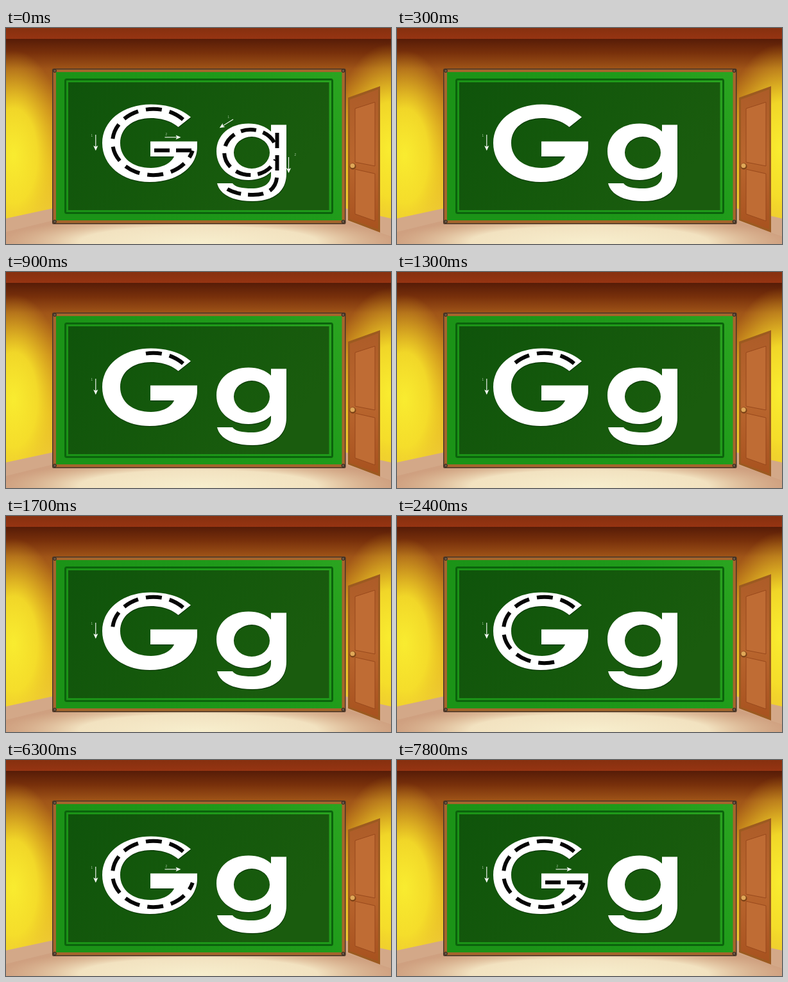
Recreate the animation shown at these times as an HTML page. Size 600 by 338 pixels, loop 8000 ms.

```html
<!DOCTYPE html>
<html lang="en">
<head>
<meta charset="utf-8">
<title>Letter tracing</title>
<style>
  html, body { margin: 0; width: 100%; height: 100%; overflow: hidden; background: #8a3f08; }
  svg { display: block; width: 100vw; height: 100vh; }
  .trace { fill: none; stroke: #050505; stroke-width: 6; }
  #lower .trace { stroke-dasharray: 24 11; }
  .arrow { fill: none; stroke: #fff; stroke-width: 1.1; }
  .head { fill: #fff; }
  text { font: 4.5px "Liberation Sans", Arial, sans-serif; fill: #b5d0b0; }
</style>
</head>
<body>
<svg viewBox="0 0 600 338" preserveAspectRatio="none">
  <defs>
    <linearGradient id="ceiling" x2="0" y2="1">
      <stop stop-color="#86300f"/><stop offset="1" stop-color="#963412"/>
    </linearGradient>
    <linearGradient id="wall" gradientUnits="userSpaceOnUse" x1="0" y1="16" x2="0" y2="300">
      <stop stop-color="#551b07"/><stop offset=".08" stop-color="#78300b"/>
      <stop offset=".17" stop-color="#a05518"/><stop offset=".4" stop-color="#c4801a"/>
      <stop offset=".72" stop-color="#e6b824"/><stop offset="1" stop-color="#f0cf3c"/>
    </linearGradient>
    <radialGradient id="glow">
      <stop stop-color="#f9ec30"/><stop offset=".45" stop-color="#f6e02a" stop-opacity=".9"/>
      <stop offset="1" stop-color="#e8b820" stop-opacity="0"/>
    </radialGradient>
    <radialGradient id="light">
      <stop stop-color="#f7eecd"/><stop offset=".6" stop-color="#f2e2c0"/>
      <stop offset="1" stop-color="#e0bf98" stop-opacity="0"/>
    </radialGradient>
    <linearGradient id="door" x2="0" y2="1">
      <stop stop-color="#ad5c28"/><stop offset=".5" stop-color="#b9662e"/><stop offset="1" stop-color="#a8521f"/>
    </linearGradient>
    <linearGradient id="rim" y2="-.3">
      <stop stop-color="#1b9317"/><stop offset=".6" stop-color="#1f9b1a"/><stop offset="1" stop-color="#2ea722"/>
    </linearGradient>
    <linearGradient id="slate" y2=".4">
      <stop stop-color="#0f540b"/><stop offset=".6" stop-color="#15590c"/><stop offset="1" stop-color="#1a5c0e"/>
    </linearGradient>
    <path id="bigG" d="M288 139.500C273 126 250 119.500 226 119.500C181 119.500 150 146 150 180C150 215 181 241 224 241C268 241 298 217 298 186V177.500H225V201H262C257 212 243 219 226 219C197 219 178 203 178 180C178 157 197 141 226 141C243 141 258 146 268.500 155Z"/>
    <path id="smallG" fill-rule="evenodd" d="M413 151.500H437V228C437 256 417 271 384 271C354 271 333 261 329 243H353C357 249 368 251 383 251C402 251 413 243 413 230V225C405 233 392 238 378 238C349 238 328 219 328 193C328 167 349 149.500 378 149.500C392 149.500 405 154 413 162ZM355 195A28 25 0 0 0 411 195A28 25 0 0 0 355 195Z"/>
    <g id="arrow"><path class="arrow" d="M0 0H20"/><path class="head" d="M17 -3.600L25 0L17 3.600L19 0Z"/></g>
    <circle id="screw" r="2.400" fill="#6b5a48" stroke="#2c2018"/>
  </defs>

  <!-- room -->
  <rect width="600" height="338" fill="url(#wall)"/>
  <ellipse cx="12" cy="200" rx="82" ry="165" fill="url(#glow)"/>
  <ellipse cx="598" cy="190" rx="90" ry="165" fill="url(#glow)"/>
  <rect width="600" height="17" fill="url(#ceiling)"/>
  <path d="M0 298L74 282H528L600 298V338H0Z" fill="#d3a888"/>
  <path d="M0 319L74 301H528L600 326V338H0Z" fill="#cfa080"/>
  <ellipse cx="300" cy="335" rx="310" ry="42" fill="url(#light)"/>

  <!-- door -->
  <path d="M533 109L583 91V320L533 301Z" fill="#9c5a20"/>
  <path d="M536 112L580 96V315L536 299Z" fill="url(#door)"/>
  <g fill="#bf6c34" stroke="#98491c">
    <path d="M544 126L575 116V216L544 210Z"/>
    <path d="M544 221L575 228V302L544 291Z"/>
  </g>
  <circle cx="540.500" cy="216.500" r="5" fill="#7d4317"/>
  <circle cx="540" cy="215.500" r="3.600" fill="#e0a858"/>

  <!-- board -->
  <rect x="72" y="63.500" width="457.500" height="243.500" rx="2" fill="#46362a"/>
  <rect x="73.500" y="65" width="454.500" height="240.500" fill="#a4652c"/>
  <rect x="78" y="69" width="445.500" height="232" fill="url(#rim)"/>
  <rect x="92.500" y="80.500" width="416" height="209" rx="2" fill="none" stroke="#0b630c" stroke-width="3"/>
  <rect x="97" y="85" width="406.500" height="200" fill="url(#slate)"/>
  <use href="#screw" x="76" y="67"/><use href="#screw" x="525.500" y="67"/>
  <use href="#screw" x="76" y="303"/><use href="#screw" x="525.500" y="303"/>

  <!-- letters -->
  <g fill="#0a3806" transform="translate(.4 1.300)"><use href="#bigG"/><use href="#smallG"/></g>
  <g fill="#fff"><use href="#bigG"/><use href="#smallG"/></g>
  <path id="ring" class="trace" pathLength="309.500" d="M276 143.200A63.500 51.700 0 1 0 290.800 192"/>
  <path id="bar" class="trace" d="M231 191.500H290"/>

  <!-- direction hints -->
  <use href="#arrow" transform="translate(139.800 167) rotate(90)"/>
  <text x="132.500" y="170">1</text>
  <g id="hint">
    <use href="#arrow" transform="translate(247.500 171)"/>
    <text x="248.500" y="168">2</text>
  </g>
  <g id="lower">
    <path class="trace" d="M418 179A41 35.500 0 1 0 420 206"/>
    <path class="trace" d="M422.500 164V228C422.500 252 408 261 385 261C368 261 355 258 345 252"/>
    <use href="#arrow" transform="translate(354 143) rotate(148)"/>
    <text x="345.500" y="141">1</text>
    <use href="#arrow" transform="translate(440.500 202) rotate(90)"/>
    <text x="449.500" y="200">2</text>
  </g>
</svg>
<script>
  const LOOP = 8000, STEP = 300;
  const INTRO_END = 100, RING_RESET = 3200, HINT_START = 6300, BAR_RESET = 7200;
  const [ring, bar, hint, lower] = ["ring", "bar", "hint", "lower"].map(id => document.getElementById(id));

  // Number of dashes drawn when one is added every STEP from a start time.
  const dashCount = (t, start, max) =>
    Math.min(max, Math.max(0, Math.floor((t - start) / STEP) + 1));

  function showDashes(path, count, on, off) {
    path.style.strokeDasharray = `${on} ${off} `.repeat(count) + "0 999";
  }

  function show(el, visible) {
    el.style.visibility = visible ? "visible" : "hidden";
  }

  function draw(t) {
    const intro = t < INTRO_END;
    const ringStart = t < RING_RESET ? 600 : 3600;
    const barStart = t < BAR_RESET ? 6600 : 7500;
    showDashes(ring, intro ? 9 : dashCount(t, ringStart, 9), 24.9, 12.3);
    showDashes(bar, intro ? 2 : dashCount(t, barStart, 2), 24, 10);
    show(hint, intro || t >= HINT_START);
    show(lower, intro);
  }

  const start = performance.now();
  function tick() {
    draw((performance.now() - start) % LOOP);
    requestAnimationFrame(tick);
  }
  tick();
</script>
</body>
</html>
```
